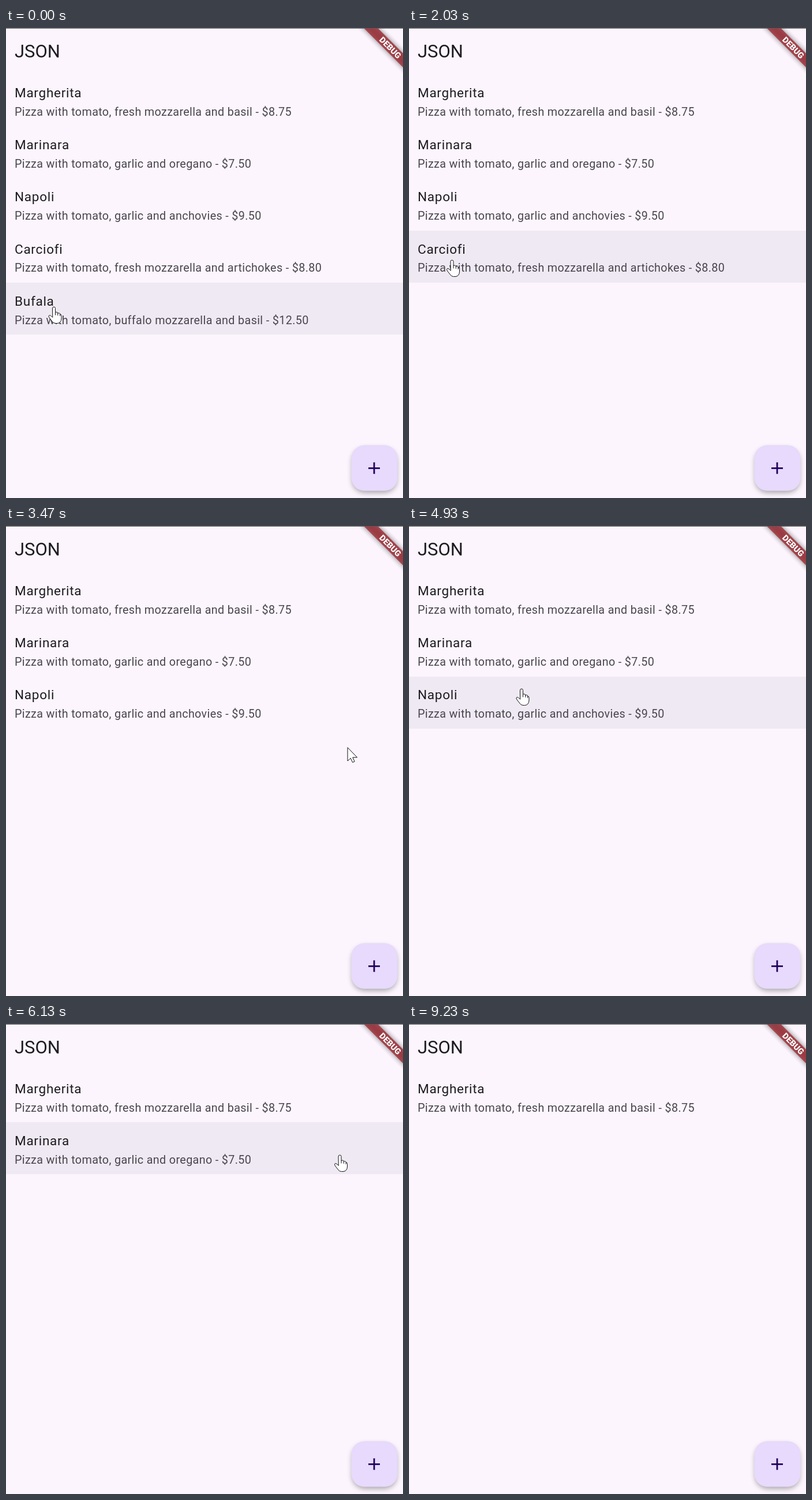
Animation, 688 px wide and 814 px high, one loop 9260 ms. Source, as an HTML page:

```html
<!DOCTYPE html>
<html lang="en">
<head>
<meta charset="utf-8">
<title>Swipe to dismiss list</title>
<style>
  html, body { margin: 0; width: 100%; height: 100%; overflow: hidden; background: #fcf5fd; }
  svg { display: block; width: 100vw; height: 100vh; }
  text { font-family: Roboto, sans-serif; white-space: pre; }
  .title { font-size: 22.57px; letter-spacing: .7px; fill: #1d1b20; }
  .detail { font-size: 19.75px; letter-spacing: .35px; fill: #49454f; }
  .cursor path { fill: #fff; stroke: #111; stroke-width: 1; stroke-linejoin: round; stroke-linecap: round; }
</style>
</head>
<body>
<svg viewBox="0 0 688 814" xmlns="http://www.w3.org/2000/svg">
  <defs>
    <filter id="soft" x="-50%" y="-50%" width="200%" height="200%"><feGaussianBlur stdDeviation="4.6"/></filter>
  </defs>
  <rect width="688" height="814" fill="#fcf5fd"/>
  <text x="15" y="51" font-size="31" fill="#1d1b20">JSON</text>
  <g id="list"></g>

  <rect x="600" y="728" width="77" height="77" rx="22" fill="#000" opacity=".33" filter="url(#soft)"/>
  <rect x="598.5" y="722.5" width="80" height="79" rx="22.5" fill="#e7dafc"/>
  <path d="M628 762.3H648M638 752.3V772.3" stroke="#21005d" stroke-width="2.8"/>

  <g transform="translate(666 34) rotate(45)">
    <rect x="-80" y="-8.5" width="160" height="17" fill="#000" opacity=".5" filter="url(#soft)"/>
    <rect x="-80" y="-8.5" width="160" height="17" fill="#b71c1c" opacity=".63"/>
    <rect x="-80" y="-8.5" width="160" height="17" fill="#8f3545" opacity=".45"/>
    <text y="5.1" text-anchor="middle" font-size="14.4" font-weight="900" fill="#fff">DEBUG</text>
  </g>
  <path d="M0 .5H688" stroke="#5a575c"/>

  <g class="cursor" id="hand">
    <path d="M-2.5 2.5Q-2.5 0 0 0Q2.5 0 2.5 2.5V9.8Q3.4 8.8 5 9.1Q6.8 9.5 6.8 11.2Q8.2 10.1 9.8 11Q10.7 11.6 10.7 13Q13 12.5 13 15.3V20Q13 24 10.8 26.3Q9 28.5 5.5 28.5H3Q-.5 28.5-2.5 25.8L-7.8 19Q-10 16.4-8.4 14.9Q-6.8 13.6-4.5 16L-2.5 18Z"/>
    <path d="M2.5 9.8V14M6.8 11.2V14.5M10.7 13V15.5" fill="none"/>
  </g>
  <g class="cursor" id="arrow">
    <path d="M0 0V23L5.2 18.1L8.6 25.4L12.1 23.9L8.8 16.8H16.2Z"/>
  </g>
</svg>
<script>
const LOOP = 9260, WIDTH = 688, ROW = 90.25, TOP = 80;
const SETTLE = 200, SLOP = 12;

// drag: [press time, release time]; way: 1 right, -1 left
const items = [
  { name: 'Margherita', detail: 'fresh mozzarella and basil - $8.75' },
  { name: 'Marinara', detail: 'garlic and oregano - $7.50', drag: [6230, 6700], way: -1 },
  { name: 'Napoli', detail: 'garlic and anchovies - $9.50', drag: [5000, 5450], way: 1 },
  { name: 'Carciofi', detail: 'fresh mozzarella and artichokes - $8.80', drag: [2450, 2920], way: 1 },
  { name: 'Bufala', detail: 'buffalo mozzarella and basil - $12.50', drag: [940, 1250], way: 1 }
];

// pointer stops: time, x, y
const stops = [
  [0, 83, 483], [940, 83, 483], [1250, 590, 470], [1400, 592, 468],
  [1950, 75, 403], [2030, 74.5, 402], [2450, 74.5, 402], [2920, 586, 390],
  [3200, 592, 384], [3650, 592, 384], [4650, 205, 366], [4850, 195, 282],
  [5000, 195, 282], [5450, 560, 272], [5600, 565, 270], [6050, 578.5, 227],
  [6230, 578.5, 227], [6700, 50, 205], [6900, 36, 197], [7700, 36, 197], [8200, -30, 205]
];

const clamp = v => Math.max(0, Math.min(1, v));
const ease = v => v * v * (3 - 2 * v);
const byId = id => document.getElementById(id);

function pointer(t) {
  const next = stops.findIndex(s => s[0] > t);
  if (next < 0) return stops[stops.length - 1].slice(1);
  const [t0, x0, y0] = stops[next - 1], [t1, x1, y1] = stops[next];
  const p = ease((t - t0) / (t1 - t0));
  return [x0 + (x1 - x0) * p, y0 + (y1 - y0) * p];
}

function make(tag, parent, attrs, content = '') {
  const el = document.createElementNS('http://www.w3.org/2000/svg', tag);
  for (const key in attrs) el.setAttribute(key, attrs[key]);
  el.textContent = content;
  return parent.appendChild(el);
}

// baselines sit on whole pixels
items.forEach((item, i) => {
  item.top = TOP + ROW * i;
  item.group = make('g', byId('list'), {});
  item.hover = make('rect', item.group, { y: Math.round(item.top), width: WIDTH, height: 90, fill: '#efe9f3' });
  make('text', item.group, { class: 'title', x: 15, y: Math.floor(item.top + 40.4) }, item.name);
  make('text', item.group, { class: 'detail', x: 15, y: Math.floor(item.top + 72) }, 'Pizza with tomato, ' + item.detail);
});

function offset({ drag, way }, t) {
  if (!drag || t <= drag[0]) return 0;
  const pull = time => way * Math.max(0, way * (pointer(time)[0] - pointer(drag[0])[0]) - SLOP);
  if (t <= drag[1]) return pull(t);
  const from = pull(drag[1]);
  return from + (way * WIDTH - from) * clamp((t - drag[1]) / SETTLE);
}

function draw(t) {
  const [x, y] = pointer(t);
  let over = false;
  for (const item of items) {
    const dx = offset(item, t);
    const hit = Math.abs(dx) < WIDTH && x >= dx && x <= dx + WIDTH && y >= item.top && y < item.top + ROW;
    over = over || hit;
    item.group.setAttribute('transform', `translate(${dx} 0)`);
    item.group.setAttribute('visibility', Math.abs(dx) < WIDTH ? 'visible' : 'hidden');
    item.hover.setAttribute('opacity', hit ? 1 : 0);
  }
  for (const [id, shown] of [['hand', over], ['arrow', !over]]) {
    byId(id).setAttribute('transform', `translate(${x} ${y})`);
    byId(id).setAttribute('visibility', shown ? 'visible' : 'hidden');
  }
}

const start = performance.now();
function tick() {
  draw((performance.now() - start) % LOOP);
  requestAnimationFrame(tick);
}
tick();
</script>
</body>
</html>
```
